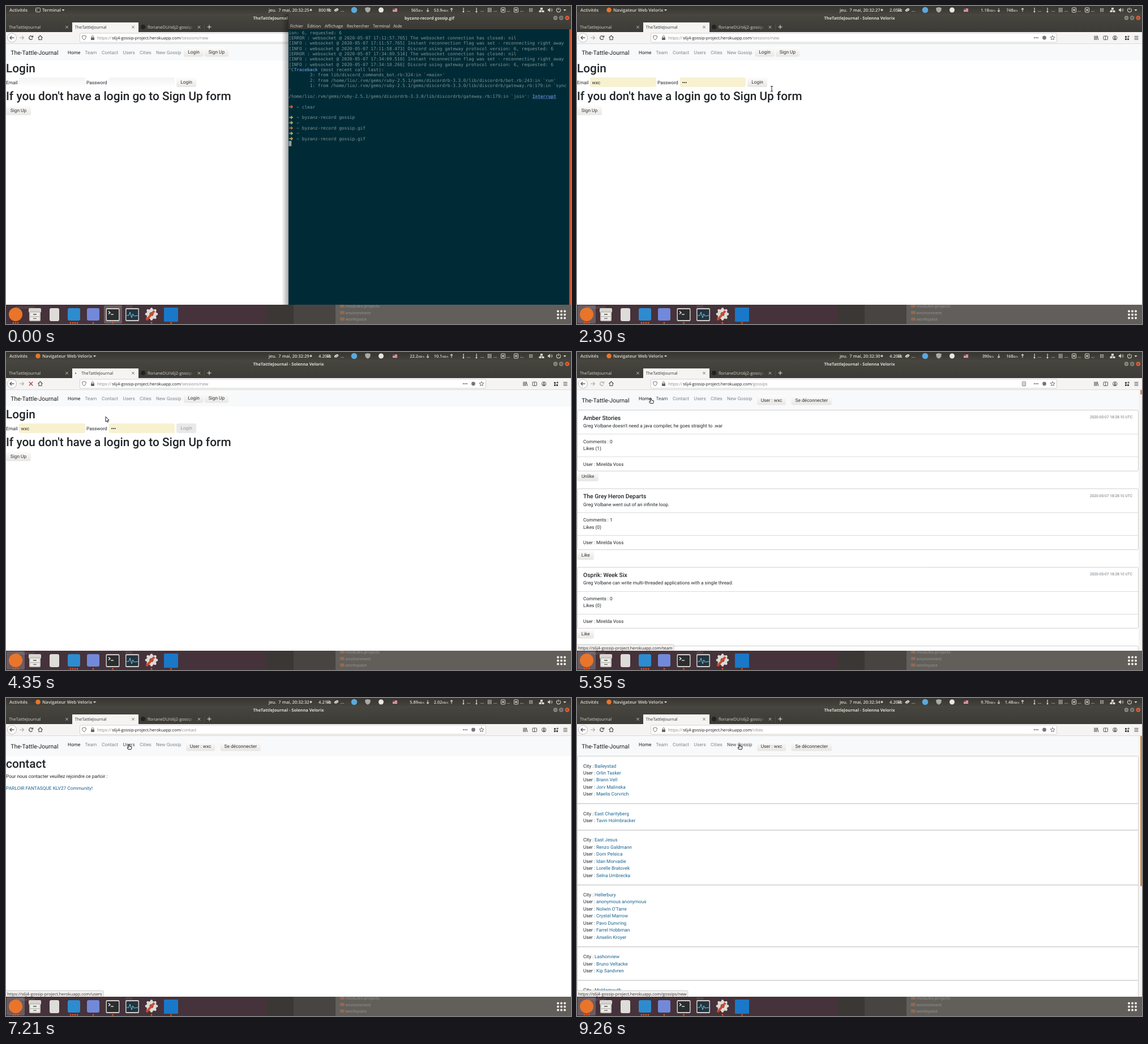
An HTML page with a canvas for the animation above (9400 ms loop, 998 by 561 pixels).

```html
<!DOCTYPE html>
<html lang="fr">
<head>
<meta charset="utf-8">
<title>Desktop recording</title>
<style>
  html, body { margin: 0; width: 100%; height: 100%; overflow: hidden; background: #3c3b37; }
  canvas { display: block; }
</style>
</head>
<body>
<canvas id="stage" width="998" height="561"></canvas>
<script>
const LOOP = 9400, RAISE = 1050, FILL = 1600, SUBMIT = 4150;
const UI = '"Open Sans", "Noto Sans", sans-serif', WEB = 'Roboto, sans-serif';
const MONO = '"DejaVu Sans Mono", monospace', SQUARED = '"Noto Sans CJK JP", "Noto Sans CJK", sans-serif';
const INK = '#212529', LINK = '#17628f', PALE = '#dfdbd2', TAU = Math.PI * 2;
const c = document.getElementById('stage').getContext('2d');
c.textRendering = 'geometricPrecision';

// Timeline: [time loaded, path, time loading began]
const visits = [[0, 'sessions/new', 0], [4900, 'gossips', 4300], [6050, 'team', 5600],
  [6550, 'contact', 6300], [7850, 'users', 7350], [8600, 'cities', 8200]];
const hovers = [[0, ''], [5300, 'team'], [6150, 'contact'], [7210, 'users'], [8000, 'cities'], [8960, 'gossips/new']];
const pointerPath = [[420, 606, 232], [610, 254, 139], [770, 254, 139], [1050, 88, 132], [1250, 88, 132],
  [1600, 78, 150], [1750, 78, 150], [2250, 344, 146], [2400, 344, 146], [2650, 350, 156], [3100, 338, 234],
  [3550, 324, 190], [3650, 324, 190], [4050, 317, 135], [4180, 312, 134], [4350, 176, 114], [4750, 138, 95],
  [5300, 130, 82], [5400, 131, 82], [5550, 148, 83], [6000, 150, 83], [6250, 180, 83], [6500, 180, 83],
  [6900, 184, 83], [7200, 184, 83], [7210, 217, 82], [7700, 217, 82], [8050, 246, 83], [8810, 248, 83],
  [8960, 264, 83], [9260, 287, 82]];
// One row per second: clock speed, download, upload
const stats = ['800M 565 53.9K', '1.07G 160 174', '2.05G 1.18K 748', '3.62G 9.31K 3.40K', '4.20G 22.2K 10.1K',
  '4.20G 390 168', '4.20G 7.45K 2.86K', '4.21G 5.89K 2.02K', '4.20G 8.12K 3.05K', '4.20G 9.70K 1.48K'];

const gossips = [
  ['Amber Stories', "Greg Volbane doesn't need a java compiler, he goes straight to .war", 0, 1],
  ['The Grey Heron Departs', 'Greg Volbane went out of an infinite loop.', 1, 0],
  ['Osprik: Week Six', 'Greg Volbane can write multi-threaded applications with a single thread.', 0, 0],
  ['', '', 0, 0]];
const cities = [
  ['Baileystad', 'Orlin Tasker', 'Brann Vell', 'Jorv Malinska', 'Maelis Corvrich'],
  ['East Charityberg', 'Tavin Holmbracker'],
  ['East Jesus', 'Renzo Galdmann', 'Dorn Pelsica', 'Idan Morvadie', 'Lorelle Bratovek', 'Selna Umbrecka'],
  ['Hellerbury', 'anonymous anonymous', "Nolwin O'Tarre", 'Crystel Marrow', 'Pavo Dunvring', 'Farrel Hobbman', 'Anselin Kroyer'],
  ['Lashonview', 'Bruno Veltacke', 'Kip Sandvren'],
  ['Moldamouth']];

const gem = '/home/lio/.rvm/gems/ruby-2.5.1/gems/discordrb-3.3.0/lib/discordrb/';
const log = (level, time, message) => `[${level} : websocket @ 2020-05-07 ${time}] ${message}`;
const CLOSED = 'The websocket connection has closed: nil';
const RETRY = 'Instant reconnection flag was set - reconnecting right away';
const GATEWAY = 'Discord using gateway protocol version: 6, requested: 6';
const shell = ['ion: 6, requested: 6',
  log('ERROR', '17:11:57.765', CLOSED), log('INFO', '17:11:57.765', RETRY), log('INFO', '17:11:58.473', GATEWAY),
  log('ERROR', '17:34:09.510', CLOSED), log('INFO', '17:34:09.510', RETRY), log('INFO', '17:34:10.266', GATEWAY),
  '^C          (most recent call last):',
  "        3: from lib/discord_commands_bot.rb:324:in `<main>'",
  `        2: from ${gem}bot.rb:243:in \`run'`, `        1: from ${gem}gateway.rb:179:in \`sync`, "'",
  `${gem}gateway.rb:179:in \`join': `, '', '➜clear', '', '➜byzanz-record gossip', '➜',
  '➜byzanz-record gossip.gif', '➜', '➜byzanz-record gossip.gif'];

// Drawing helpers
function rect(x, y, w, h, fill, r = 0) {
  c.fillStyle = fill;
  c.beginPath();
  c.roundRect(x, y, w, h, r);
  c.fill();
}
function frame(x, y, w, h, color, r = 0, width = 1) {
  c.strokeStyle = color;
  c.lineWidth = width;
  c.beginPath();
  c.roundRect(x, y, w, h, r);
  c.stroke();
}
function disc(x, y, r, fill) {
  c.fillStyle = fill;
  c.beginPath();
  c.arc(x, y, r, 0, TAU);
  c.fill();
}
function line(color, width, ...p) {
  c.strokeStyle = color;
  c.lineWidth = width;
  c.beginPath();
  for (let i = 0; i < p.length; i += 2) c.lineTo(p[i], p[i + 1]);
  c.stroke();
}
function gradient(x0, y0, x1, y1, from, to) {
  const g = c.createLinearGradient(x0, y0, x1, y1);
  g.addColorStop(0, from);
  g.addColorStop(1, to);
  return g;
}
const fade = (y, h, top, bottom) => gradient(0, y, 0, y + h, top, bottom);
function text(s, x, y, font, color, align = 'left') {
  c.font = font;
  c.fillStyle = color;
  c.textAlign = align;
  c.fillText(s, x, y);
}
const ui = (s, x, y, color = PALE, size = 7.4, weight = 400, align) => text(s, x, y, `${weight} ${size}px ${UI}`, color, align);
const web = (s, x, y, color = INK, size = 8.32, weight = 400, align) => text(s, x, y, `${weight} ${size}px ${WEB}`, color, align);
const mono = (s, col, y, color = '#839496', weight = 400) => text(s, 499.3 + col * 4.68, y, `${weight} 7.78px ${MONO}`, color);
const heading = (s, y) => web(s, 0, y, INK, 20.8, 500);
function cross(x, y, color, r = 2.2, width = 0.9) {
  line(color, width, x - r, y - r, x + r, y + r);
  line(color, width, x + r, y - r, x - r, y + r);
}
function caretDown(x, y) {
  c.fillStyle = PALE;
  c.beginPath();
  c.moveTo(x - 2.5, y - 1);
  c.lineTo(x + 2.5, y - 1);
  c.lineTo(x, y + 2);
  c.fill();
}
function button(label, x, y, w, h = 17, disabled = false) {
  rect(x, y, w, h, disabled ? '#e9e9e9' : fade(y, h, '#fdfdfd', '#e8e6e3'), 3);
  web(label, x + w / 2, y + h / 2 + 2.9, disabled ? '#999' : '#333', 8.32, 400, 'center');
}
const current = (list, t) => list.filter(item => item[0] <= t).pop();

function topBar(t) {
  const second = Math.floor((t + 200) / 1000);
  const [speed, down, up] = stats[second].split(' ');
  rect(0, 0, 998, 14, fade(0, 14, '#37352f', '#45433e'));
  ui('Activités', 6, 9.8, PALE, 7.8, 600);
  if (t < RAISE) {
    frame(52.5, 3.5, 8, 7, PALE, 1, 0.9);
    line(PALE, 0.8, 54, 5.5, 55.5, 7, 54, 8.5);
    ui('Terminal', 64, 9.8, PALE, 7.8, 600);
    caretDown(101, 7);
  } else {
    disc(56.5, 7, 4.3, '#e8752a');
    ui('Navigateur Web Velorix', 64, 9.8, PALE, 7.8, 600);
    caretDown(156.5, 7);
  }
  ui(`jeu.  7 mai, 20:32:${25 + second}`, 464, 9.8, PALE, 7.6, 600);
  disc(538.5, 7, 2, '#c9c5bc');
  ui(speed.slice(0, -1), 552, 9.8, PALE, 7.6, 600);
  text(speed.endsWith('M') ? '㎒' : '㎓', 566.5, 9.8, `600 7.6px ${SQUARED}`, PALE);
  c.fillStyle = PALE;
  c.beginPath();
  c.ellipse(583.5, 7, 4, 2.4, -0.5, 0, TAU);
  c.fill();
  line('#45433e', 0.7, 580, 10, 586, 5.5);
  disc(615, 7, 5.3, '#5aa9dc');
  c.fillStyle = '#a9aaa5';
  c.beginPath();
  [[634, 3.5], [639, 2], [644, 3.5], [643, 9], [639, 12], [635, 9]].forEach(p => c.lineTo(...p));
  c.fill();
  disc(662.5, 7, 4.5, '#e8e6e2');
  rect(683, 4, 8, 6, '#e8dedd');
  for (let i = 0; i < 3; i++) rect(683, 4 + i * 2, 8, 1, '#c2444b');
  rect(683, 4, 4, 3, '#46528c');
  for (const [value, x] of [[down, 725.5], [up, 768]]) {
    const kilo = value.endsWith('K'), unit = kilo ? 'KB/s' : 'B/s';
    const split = x + (kilo ? 2.5 : 2.8);
    ui(value.replace('K', ''), split, 10, PALE, 7.4, 600, 'right');
    ui(unit, split + 0.3, 10, PALE, 4.8, 600);
  }
  for (const [x, s] of [[745, 1], [787, -1]]) {
    line(PALE, 1.1, x, 7 - 3 * s, x, 7 + 3 * s);
    line(PALE, 1.1, x - 2, 7 + s, x, 7 + 3 * s, x + 2, 7 + s);
  }
  for (const x of [591, 814, 838, 861, 884, 908]) ui('…', x, 9.8, PALE, 7.6, 600);
  for (const x of [808, 831]) { rect(x - 0.5, 3, 1.2, 5, PALE); disc(x, 10, 1.4, PALE); }
  for (const x of [851, 853.5, 856]) rect(x, 3, 1.3, 8, '#bcb8b0');
  for (const x of [878, 901]) { frame(x - 3.5, 3, 7, 8, PALE, 1); disc(x, 7, 1.7, PALE); }
  for (let i = 0; i < 6; i++) rect(924 + i % 2 * 3.5, 4 + (i >> 1) * 2.3, 2.8, 1.6, '#aaa69e');
  rect(944, 3, 4, 3, PALE); rect(941.5, 8, 4, 3, PALE); rect(946.5, 8, 4, 3, PALE);
  line(PALE, 0.8, 946, 6, 946, 7.2, 943, 7.2, 949, 7.2);
  c.fillStyle = PALE;
  c.beginPath();
  [[957, 5.5], [959, 5.5], [961, 3], [961, 11], [959, 8.5], [957, 8.5]].forEach(p => c.lineTo(...p));
  c.fill();
  for (const r of [2, 4]) { c.strokeStyle = PALE; c.lineWidth = 0.8; c.beginPath(); c.arc(961, 7, r, -0.9, 0.9); c.stroke(); }
  c.beginPath(); c.lineWidth = 1.1; c.arc(976, 7.3, 3.5, -1, 4.15); c.stroke();
  line(PALE, 1.1, 976, 2.8, 976, 7);
  caretDown(987, 7);
}

function titleButtons() {
  for (const [x, fill] of [[970.5, '#8d8a82'], [980.7, '#8d8a82'], [991.3, '#e3603a']]) disc(x, 21, 3.7, fill);
  line('#3c3b37', 0.9, 968.8, 21, 972.2, 21);
  frame(979.2, 19.6, 3, 2.8, '#3c3b37', 0, 0.8);
  cross(991.3, 21, '#4b2a20', 1.4, 0.8);
}

function browser(t, path, loading, loadedAt) {
  rect(0, 14, 998, 32, fade(14, 32, '#48463f', '#3c3b37'));
  ui('TheTattleJournal - Solenna Velorix', 499, 23.7, PALE, 7.4, 700, 'center');
  titleButtons();
  rect(117, 29, 117, 17, '#f6f4f2');
  ui('TheTattleJournal', 5, 39.8, '#d6d3cb');
  ui('TheTattleJournal', loading ? 133 : 121.5, 39.8, '#2e3436');
  if (loading) disc(123 + 1.5 * (1 - Math.cos((t - loading) / 160)), 37.5, 1.1, '#555');
  disc(242, 37, 4, '#22221f');
  ui('florianeDU/s6j2-gossip-', 250, 39.8, '#d6d3cb');
  rect(318, 31, 32, 13, gradient(318, 0, 335, 0, 'rgba(64,62,57,0)', '#403e39'));
  cross(107.5, 37.3, '#d6d3cb');
  cross(224.5, 37.3, '#555');
  cross(341, 37.3, '#d6d3cb');
  rect(350, 32, 0.7, 12, '#58564f');
  line(PALE, 1.1, 355.5, 37, 362.5, 37);
  line(PALE, 1.1, 359, 33.5, 359, 40.5);

  rect(0, 46, 998, 21, '#f6f4f2');
  rect(0, 66.3, 998, 0.7, '#d4d1cd');
  disc(10.5, 56, 8.2, '#fff');
  frame(2.5, 48, 16, 16, '#aaa', 8, 0.8);
  const dark = '#45484a';
  line(dark, 1.2, 14.5, 56, 7, 56);
  line(dark, 1.2, 10, 53, 7, 56, 10, 59);
  line('#aaa', 1.1, 24, 56, 31, 56);
  line('#aaa', 1.1, 28.5, 53, 31.5, 56, 28.5, 59);
  if (loading) cross(44, 56, '#a8433c', 3.2, 1.3);
  else {
    const color = loadedAt && t - loadedAt < 650 ? '#aaa' : dark;
    c.strokeStyle = color;
    c.lineWidth = 1.2;
    c.beginPath();
    c.arc(44, 56, 3.2, 0.5, 5.5);
    c.stroke();
    line(color, 1.2, 47.5, 52, 47.5, 54.8, 44.8, 54.8);
  }
  line(dark, 1.1, 56.5, 56, 60.5, 52, 64.5, 56);
  line(dark, 1.1, 58, 55.5, 58, 59.5, 63, 59.5, 63, 55.5);
  rect(130.5, 48, 717, 16, '#fff', 2);
  frame(130.5, 48, 717, 16, '#cbc8c4', 2, 0.8);
  c.strokeStyle = '#666';
  c.lineWidth = 0.9;
  c.beginPath();
  [[134.5, 53], [138, 52], [141.5, 53], [140.8, 57], [138, 60], [135.2, 57], [134.5, 53]].forEach(p => c.lineTo(...p));
  c.stroke();
  rect(150, 55.5, 6, 4.5, '#666', 0.5);
  frame(151.2, 52.5, 3.6, 4.5, '#666', 1.8, 0.9);
  ui('https://', 161, 58.8, '#888');
  ui('s6j4-gossip-project.herokuapp.com', 187.3, 58.8, '#16191b');
  ui('/' + path, 308.3, 58.8, '#888');
  if (path === 'gossips') {
    frame(786.5, 52.5, 6, 7.5, '#666', 0.5, 0.8);
    for (const y of [54.5, 56.3, 58.1]) rect(788, y, 3.2, 0.7, '#666');
  }
  for (const x of [808, 811, 814]) disc(x, 56, 1, '#555');
  disc(825.5, 56, 3.4, '#777');
  c.beginPath();
  for (let i = 0; i < 11; i++) {
    const a = i * TAU / 10 - TAU / 4, r = i % 2 ? 1.9 : 4.2;
    c.lineTo(840 + r * Math.cos(a), 56.2 + r * Math.sin(a));
  }
  c.strokeStyle = '#555';
  c.lineWidth = 0.8;
  c.stroke();
  for (const x of [913.5, 915.5, 917.5]) rect(x, 52.5, 1, 7.5, dark);
  line(dark, 1, 919, 52.5, 921, 60);
  frame(930, 53, 7.5, 6.5, dark, 1, 0.9);
  rect(933, 53, 0.8, 6.5, dark);
  frame(946.5, 52.5, 7.4, 7.4, dark, 3.7, 0.9);
  disc(950.2, 55, 1.3, dark);
  rect(948.2, 57, 4, 1.8, dark, 1);
  rect(968, 53, 3, 3, dark); rect(968, 57, 3, 3, dark); rect(972, 57, 3, 3, dark);
  line(dark, 1, 974, 52, 974, 56); line(dark, 1, 972, 54, 976, 54);
  for (const y of [53, 55.7, 58.4]) rect(984.5, y, 7, 1, dark);
}

function navigation(path, hover) {
  const guest = path === 'sessions/new';
  rect(0, 67, 998, guest ? 29 : 35.5, '#f8f9fa');
  web('The-Tattle-Journal', 8.3, guest ? 85.6 : 88.8, '#1a1a1a', 10.4);
  [['Home', 109, '-'], ['Team', 139.5, 'team'], ['Contact', 169, 'contact'], ['Users', 206.5, 'users'],
    ['Cities', 236, 'cities'], ['New Gossip', 265, 'gossips/new']].forEach(([label, x, target], i) =>
    web(label, x, 84.8, i === 0 ? '#19191a' : target === hover ? '#4a4b4b' : '#848585'));
  if (guest) {
    button('Login', 314, 72.5, 35);
    button('Sign Up', 351, 72.5, 42);
  } else {
    button('User : wxc', 318, 76.5, 51);
    button('Se déconnecter', 378.5, 76.5, 71.5);
  }
}

function loginPage(t) {
  heading('Login', 117.2);
  web('Email', 0, 137.5);
  web('Password', 142, 137.5);
  const filled = t >= FILL;
  for (const [x, w] of [[23, 117], [181.5, 116.5]])
    rect(x, 126, w, 17, filled ? '#f8f1d0' : fade(126, 17, '#f3f3f3', '#fefefe'), 3);
  if (filled) {
    web('wxc', 26.5, 137.5);
    for (const x of [187, 189.8, 192.6]) disc(x, 135, 1, INK);
  }
  const since = t - (filled ? FILL : RAISE);
  if (since >= 0 && t < SUBMIT && since % 1060 < 530) rect(filled ? 40.3 : 27, 129, 0.7, 11, '#222');
  button('Login', 301, 126, 35, 17, t >= SUBMIT);
  heading("If you don't have a login go to Sign Up form", 165.7);
  button('Sign Up', 0, 175.5, 44);
}

function gossipPage() {
  gossips.forEach(([title, body, comments, likes], i) => {
    const y = 102.5 + i * 138.7;
    frame(0.5, y, 991, 107.5, '#cfcfcf', 2);
    for (const dy of [42, 82]) rect(0.5, y + dy, 991, 0.8, '#cfcfcf');
    web(title, 11, y + 17, INK, 10.4, 500);
    web('2020-05-07 18:28:10 UTC', 981, y + 14.3, '#6c757d', 6.66, 400, 'right');
    web(body, 11, y + 30.5);
    web(`Comments : ${comments}`, 11, y + 58);
    web(`Likes (${likes})`, 11, y + 70.5);
    web('User : Mirelda Voss', 11, y + 98);
    button(likes ? 'Unlike' : 'Like', 0.5, y + 108.5, likes ? 37.5 : 29.5);
  });
}

function groupedList(groups) {
  let y = 122.5;
  frame(0.5, 102.5, 991, 500, '#cfcfcf', 2);
  for (const [city, ...users] of groups) {
    const rows = users.map(name => ['User :', 34, name]);
    if (city) rows.unshift(['City :', 31, city]);
    for (const [label, x, value] of rows) {
      web(label, 11, y);
      web(value, x, y, LINK);
      y += 12.47;
    }
    rect(1, y + 1, 990, 1.2, '#c6c6c6');
    y += 21.8;
  }
}

const pages = {
  'sessions/new': loginPage,
  gossips: gossipPage,
  team() {
    heading('team', 123);
    web('Voici la team qui a réalisé ce projet.', 0, 141);
  },
  contact() {
    heading('contact', 123);
    web('Pour nous contacter veuillez rejoindre ce parloir :', 0, 141);
    web('PARLOIR FANTASQUE KLV27 Community!', 0, 161.5, LINK);
  },
  users: () => groupedList(cities.flatMap(([, ...users]) => users.map(name => ['', name]))),
  cities: () => groupedList(cities)
};
const thumbs = { gossips: 8, users: 150, cities: 265 };

function prompt(y, color) {
  line(color, 1.5, 500, y - 2.7, 505.5, y - 2.7);
  line(color, 1.5, 503.3, y - 5.2, 506, y - 2.7, 503.3, y - 0.2);
}

function terminal() {
  rect(487, 14, 12, 513, gradient(487, 0, 499, 0, 'rgba(0,0,0,0)', 'rgba(0,0,0,.35)'));
  rect(499, 14, 499, 27, fade(14, 27, '#46443e', '#3a3934'));
  ui('byzanz-record gossip.gif', 748, 23.7, PALE, 7.4, 700, 'center');
  titleButtons();
  [['Fichier', 502], ['Édition', 532], ['Affichage', 563], ['Rechercher', 602], ['Terminal', 648], ['Aide', 684]]
    .forEach(([label, x]) => ui(label, x, 37.8, PALE, 7.5));
  rect(499, 41, 499, 486, '#002b36');
  rect(995, 41, 3, 486, '#c4572f');
  shell.forEach((row, i) => {
    const y = 49.5 + i * 9.36;
    if (row[0] !== '➜') return mono(row, 0, y);
    prompt(y, i === 14 || i === 18 ? '#e0693a' : '#c9b25a');
    mono('~', 3, y);
    mono(row.slice(1), 5, y);
  });
  mono('Traceback', 2, 115, '#5b83c0', 700);
  mono('Interrupt', shell[12].length, 161.8, '#5b83c0', 700);
  rect(499.3 + shell[12].length * 4.68, 162.8, 42, 0.8, '#5b83c0');
  rect(499.5, 238, 4.7, 9.3, '#93a1a1');
}

function dock(t) {
  rect(0, 527, 998, 34, '#46323a');
  rect(460, 527, 48, 34, '#3b3735');
  rect(508, 527, 74, 34, '#484441');
  rect(582, 527, 416, 34, '#625f5b');
  c.save();
  c.beginPath();
  c.rect(0, 527, 998, 34);
  c.clip();
  ui('personnel', 17, 533.5, '#75646a', 7);
  ui('xlsx', 211, 532, '#75646a', 7);
  ['modules-projects', 'environment', 'workspace'].forEach((label, i) => {
    const y = 530 + i * 11.5;
    rect(590, y - 3.5, 8, 5.5, '#8f6a52', 1);
    ui(label, 600, y + 2.3, '#989590', 7.4);
  });
  c.restore();
  rect(t < RAISE ? 173 : 1, 528, 32, 32, 'rgba(255,255,255,.2)', 2);
  disc(17, 544, 12, '#e8752a');
  rect(40, 533, 22, 8, '#d8d6d0', 2);
  rect(41, 538, 20, 18, '#c9c7c1', 2);
  rect(43, 541, 16, 6, '#eeece8');
  rect(43, 549, 16, 5, '#eeece8');
  rect(48, 543, 6, 2, '#777');
  rect(48, 550.5, 6, 1.5, '#777');
  rect(77, 533, 17, 23, '#dddcd9', 3);
  rect(109, 533, 22, 22, '#2d8ccf', 3);
  rect(143, 533, 22, 22, '#7289da', 3);
  rect(176.5, 533, 24, 23, '#d0cfcb', 2);
  rect(178, 535, 21, 19, '#2b2d2e', 1);
  line('#fff', 1.2, 181, 538.5, 184, 541, 181, 543.5);
  rect(185, 543.5, 5, 1.2, '#fff');
  rect(211, 533, 24, 23, '#cfd0cd', 2);
  rect(212.5, 535, 21, 19, '#24343f', 1);
  line('#6fc5e0', 1, 213, 546, 217, 546, 219, 540, 222, 550, 224, 543, 226, 547, 233, 546);
  for (let i = 0; i < 8; i++) disc(257 + 9 * Math.cos(i * TAU / 8), 543.5 + 9 * Math.sin(i * TAU / 8), 2.3, '#dddad5');
  disc(257, 543.5, 9, '#dddad5');
  disc(257, 543.5, 3.5, '#6b5a58');
  line('#d0482f', 4, 248, 554, 262, 538);
  rect(279, 532, 25, 25, '#1a78c8', 1);
  for (const x of [13, 17, 21, 114, 118, 122, 126, 154, 188.5, 257, 291.5]) disc(x, 559, 1.4, '#e95420');
  for (let i = 0; i < 9; i++) disc(975 + i % 3 * 6, 538.5 + Math.floor(i / 3) * 6, 2, '#f4f3f1');
}

function pointer(t, hover) {
  if (t < pointerPath[0][0]) return;
  const i = pointerPath.findLastIndex(p => p[0] <= t), a = pointerPath[i], b = pointerPath[i + 1] || a;
  const k = a === b ? 0 : (t - a[0]) / (b[0] - a[0]), ease = k * k * (3 - 2 * k);
  c.save();
  c.translate(a[1] + (b[1] - a[1]) * ease, a[2] + (b[2] - a[2]) * ease);
  if (t < 480 || t > 1650 && t < 3600) {
    line('#fff', 2.2, 0, -4, 0, 4);
    line('#222', 1, 0, -4, 0, 4);
    for (const y of [-4.3, 4.3]) line('#222', 1, -2, y, 2, y);
  } else {
    const shape = hover
      ? [[-0.8, 0], [0.8, 0], [1, 3], [4.8, 4], [4.8, 6.5], [4, 8.6], [-1.2, 8.6], [-3, 5.5], [-2.2, 4.8], [-0.8, 6]]
      : [[0, 0], [0, 9], [2, 7.3], [3.3, 10], [4.7, 9.3], [3.5, 6.7], [6, 6.3]];
    c.beginPath();
    shape.forEach(p => c.lineTo(...p));
    c.closePath();
    c.fillStyle = '#fff';
    c.strokeStyle = '#1c1c1c';
    c.lineWidth = 1;
    c.lineJoin = 'round';
    c.fill();
    c.stroke();
  }
  c.restore();
}

function draw(t) {
  const [loadedAt, path] = current(visits, t), hover = current(hovers, t)[1];
  const pending = visits.find(v => v[2] <= t && t < v[0]);
  rect(0, 67, 998, 460, '#fff');
  navigation(path, hover);
  pages[path](t);
  if (thumbs[path]) {
    rect(992, 67, 6, 460, '#f4f3f1');
    rect(995, 67, 3, thumbs[path], '#cc8e50', 1);
  }
  if (hover) {
    const status = 'https://s6j4-gossip-project.herokuapp.com/' + hover;
    c.font = `400 7.4px ${UI}`;
    const width = c.measureText(status).width + 4.5;
    rect(-2, 516, width + 2, 12, '#f1efed', 2);
    frame(-2, 516, width + 2, 12, '#c4c1bd', 2, 0.8);
    ui(status, 2, 524.5, '#333');
  }
  browser(t, path, pending && pending[2], loadedAt);
  if (t < RAISE) terminal();
  topBar(t);
  dock(t);
  pointer(t, hover);
}

const start = performance.now();
function tick() {
  draw((performance.now() - start) % LOOP);
  requestAnimationFrame(tick);
}
tick();
</script>
</body>
</html>
```
